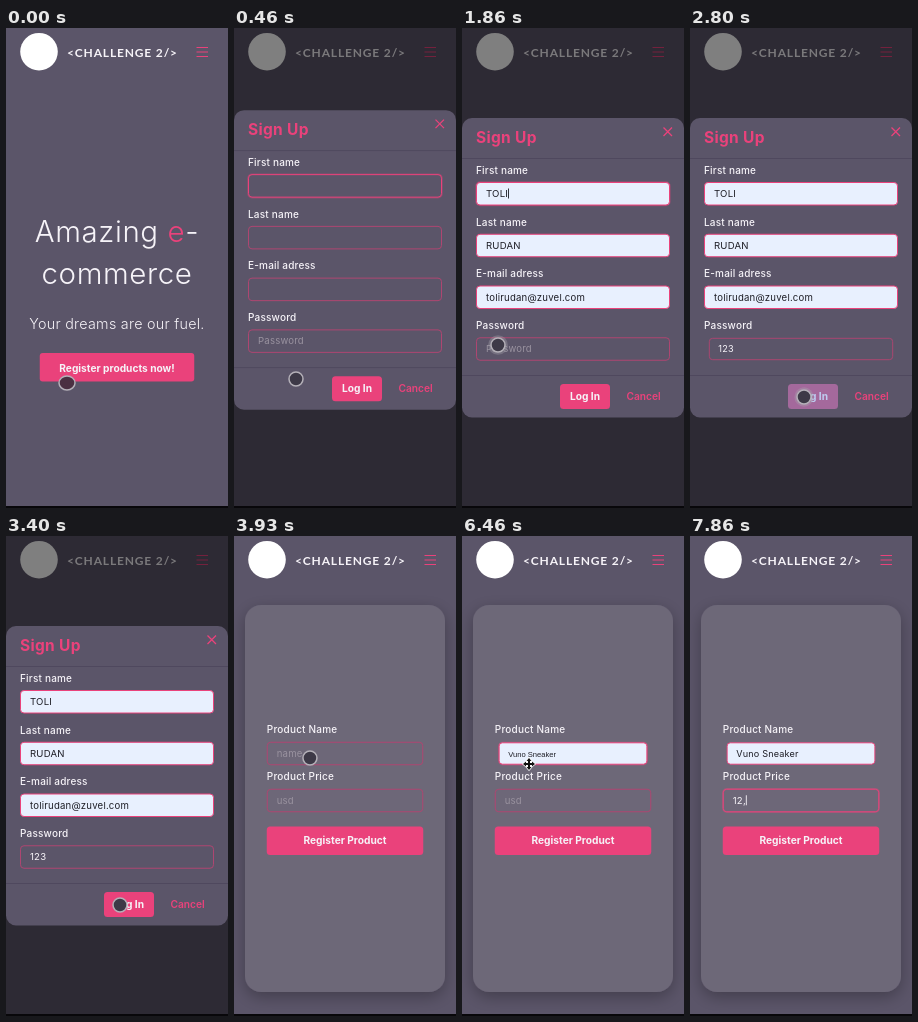
Recreate the animation shown at these times as an HTML page. Size 222 by 480 pixels, loop 8000 ms.

```html
<!DOCTYPE html>
<html lang="en">
<head>
<meta charset="utf-8">
<title>Register products</title>
<style>
  html, body { margin: 0; width: 100%; height: 100%; overflow: hidden; background: #5b5569; }
  svg { display: block; width: 100%; height: 100%; }
  text { font-family: Inter, sans-serif; font-size: 10px; letter-spacing: .02em; fill: #f6f3f8; white-space: pre; }
  .brand { font: 700 12px Lato, sans-serif; letter-spacing: .07em; }
  .hero { font-size: 29.5px; font-weight: 350; text-anchor: middle; }
  .lead { font-size: 14.3px; font-weight: 350; text-anchor: middle; }
  .label { font-weight: 500; }
  .value { font-size: 9.6px; }
  .strong { font-size: 10.2px; font-weight: 700; text-anchor: middle; letter-spacing: 0; }
  .title { font-size: 15.5px; font-weight: 700; }
  .plain { font: 8px "Liberation Sans", Arial, sans-serif; letter-spacing: 0; }
  .pink { fill: #ea427b; }
  .line { fill: none; stroke: #ea427b; }
</style>
</head>
<body>
<svg viewBox="0 0 222 480" preserveAspectRatio="none">
  <defs>
    <filter id="shadow" x="-20%" y="-20%" width="140%" height="140%">
      <feDropShadow dx="0" dy="5" stdDeviation="8" flood-opacity=".28"/>
    </filter>
  </defs>
  <rect width="222" height="480" fill="#5b5569"/>

  <g id="home">
    <text class="hero" x="111" y="213.5">Amazing <tspan class="pink">e</tspan>-</text>
    <text class="hero" x="111" y="256">commerce</text>
    <text class="lead" x="111" y="301">Your dreams are our fuel.</text>
    <rect class="pink" x="33.75" y="325" width="154.5" height="28.5" rx="3"/>
    <text class="strong" x="111" y="343.5">Register products now!</text>
  </g>

  <g id="shop">
    <rect x="11" y="69" width="200" height="387" rx="16" fill="#6d6778" filter="url(#shadow)"/>
    <text class="label" x="32.8" y="197.3">Product Name</text>
    <text class="label" x="32.8" y="244.3">Product Price</text>
    <g id="shopFields"></g>
    <rect class="pink" x="32.75" y="290.5" width="156.5" height="28.5" rx="3.5"/>
    <text class="strong" x="111" y="308.2">Register Product</text>
  </g>

  <circle cx="33" cy="23.7" r="18.8" fill="#fff"/>
  <text class="brand" x="61" y="28.5">&lt;CHALLENGE 2/&gt;</text>
  <path class="line" stroke-width="1.2" d="M190.500 19.500h11.500M190.500 24h11.500M190.500 28.500h11.500"/>

  <rect id="backdrop" width="222" height="480"/>
  <g id="modal">
    <rect y="90" width="222" height="299.5" rx="10" fill="#5b5569"/>
    <path d="M0 130.5H222M0 347.5H222" stroke="#4f485e"/>
    <text class="title pink" x="14" y="115">Sign Up</text>
    <path class="line" stroke-width="1.3" d="M201.500 99.500l8.500 8.500m0-8.500l-8.500 8.500"/>
    <text class="label" x="14" y="146">First name</text>
    <text class="label" x="14" y="198">Last name</text>
    <text class="label" x="14" y="249">E-mail adress</text>
    <text class="label" x="14" y="301">Password</text>
    <g id="signFields"></g>
    <rect id="login" x="98" y="356" width="50" height="25" rx="3.5"/>
    <text id="loginText" class="strong" x="123" y="372">Log In</text>
    <text class="strong pink" style="font-weight:600" x="181.5" y="372">Cancel</text>
  </g>

  <g id="pointer">
    <circle id="halo" fill="#aaa6ae" fill-opacity=".35"/>
    <ellipse id="dot" stroke="#b4b0b8" stroke-width="1.5"/>
  </g>
  <path id="mover" d="M0-6l2.500 3h-1.500v2h2v-1.500l3 2.500-3 2.500v-1.500h-2v2h1.500l-2.500 3-2.500-3h1.500v-2h-2v1.500l-3-2.500 3-2.500v1.500h2v-2h-1.500z"
        fill="#111" stroke="#fff" stroke-width="1.6" stroke-linejoin="round" paint-order="stroke"/>
  <rect y="478" width="222" height="2" fill="#08070a"/>
</svg>
<script>
const LOOP = 8000;
const PINK = [234, 66, 123], DIM = [174, 70, 113], DARK = [30, 30, 38];
const WHITE = [246, 243, 248], PALE = [232, 240, 254], PLUM = [164, 105, 156];
const $ = id => document.getElementById(id);
const set = (el, attrs) => Object.entries(attrs).forEach(([k, v]) => el.setAttribute(k, v));
const ramp = (t, a, b) => Math.min(1, Math.max(0, (t - a) / (b - a)));
const easeOut = p => 1 - (1 - p) ** 3;
const rgb = c => `rgb(${c.map(Math.round)})`;
const mix = (a, b, p) => rgb(a.map((v, i) => v + (b[i] - v) * p));
const show = (el, on) => { el.style.display = on ? '' : 'none'; };

function add(parent, tag, attrs = {}) {
  const el = document.createElementNS('http://www.w3.org/2000/svg', tag);
  set(el, attrs);
  return parent.appendChild(el);
}

// Linear path through [time, x, y] stops.
function along(t, stops) {
  const i = stops.findIndex(s => s[0] > t);
  if (i < 0) return stops.at(-1).slice(1);
  if (i === 0) return stops[0].slice(1);
  const [a, b] = [stops[i - 1], stops[i]];
  const p = ramp(t, a[0], b[0]);
  return [1, 2].map(k => a[k] + (b[k] - a[k]) * p);
}

function makeField(parent, x, y, w, base, placeholder = '') {
  const h = 23.5, cx = x + w / 2, cy = y + h / 2;
  const box = { x: x + .5, y: y + .5, width: w - 1, height: h - 1, rx: 3.5 };
  const g = add(parent, 'g');
  const glow = add(g, 'rect', { ...box, fill: 'none', stroke: rgb(PINK), 'stroke-width': 2.5, 'stroke-opacity': .35 });
  const rect = add(g, 'rect', { ...box, 'stroke-width': 1 });
  const label = add(g, 'text', { x: x + 10, y: y + 15 });
  const caret = add(g, 'rect', { y: y + 6.5, width: .9, height: 10 });
  return ({ text = '', fill = 0, preview = false, focus = false, blink = false, scale = 1 }) => {
    const ink = mix(WHITE, DARK, fill);
    set(g, { transform: `translate(${cx} ${cy}) scale(${scale}) translate(${-cx} ${-cy})` });
    set(rect, { fill: mix(base, PALE, fill), stroke: rgb(focus || fill ? PINK : DIM) });
    label.textContent = text || placeholder;
    label.setAttribute('class', preview ? 'plain' : 'value');
    label.style.fill = text ? ink : '#99929f';
    const end = text && !preview ? label.getComputedTextLength() : 0;
    set(caret, { x: x + 10 + end, fill: ink });
    show(glow, focus);
    show(caret, focus && blink);
  };
}

const MODAL_BG = [91, 85, 105], CARD_BG = [109, 103, 120];
const [first, last, email, password] = ['', '', '', 'Password'].map((hint, i) =>
  makeField($('signFields'), 14, 154 + i * 51.75, 194, MODAL_BG, hint));
const [product, price] = ['name', 'usd'].map((hint, i) =>
  makeField($('shopFields'), 32.75, 205.75 + i * 47, 156.5, CARD_BG, hint));

const typed = (t, text, times) => text.slice(0, times.filter(at => t >= at).length);
const blinks = (t, start) => Math.floor((t - start) / 530) % 2 === 0;

const POINTER = [
  [0, 61, 355], [260, 62, 351], [1730, 62, 351], [1860, 36, 317],
  [2600, 36, 317], [2790, 114, 369], [3660, 114, 369], [3800, 96, 290],
  [3930, 76, 222], [4130, 67, 228], [6660, 67, 228]
];
const PRESSES = [[0, 200], [1800, 2000], [2740, 2960], [4150, 4330]];

function drawSignUp(t) {
  const opening = easeOut(ramp(t, 300, 650));
  const closing = ramp(t, 3430, 3580);
  set($('backdrop'), { opacity: .5 * ramp(t, 60, 330) * (1 - ramp(t, 3480, 3660)) });
  set($('modal'), {
    opacity: Math.min(1, opening * 1.3) * (1 - closing),
    transform: `translate(0 ${-50 * (1 - opening) - 40 * closing})`
  });

  const shown = t >= 860, accepted = t >= 1460;
  const fill = shown ? ramp(t, 790, 1090) : 0;
  const preview = shown && !accepted;
  const entry = text => ({ text: shown ? text : '', fill, preview });
  first({ ...entry('TOLI'), focus: t < 2000, blink: blinks(t, 800) });
  last(entry('RUDAN'));
  email(entry(accepted ? 'tolirudan@zuvel.com' : 'toli.rudan@korvu.com'));
  password({
    text: typed(t, '123', [2130, 2260, 2400]),
    focus: t >= 2000 && t < 2750, blink: blinks(t, 2400),
    scale: 1 - .05 * (ramp(t, 1870, 2100) - ramp(t, 2810, 3000))
  });

  const hover = ramp(t, 2660, 2790) * (1 - ramp(t, 3000, 3400));
  $('login').style.fill = mix(PINK, PLUM, hover);
  $('loginText').style.fill = mix(WHITE, [190, 204, 240], hover);
}

function drawShop(t) {
  const chosen = t >= 6260, preview = chosen && t < 6660;
  product({
    text: chosen ? 'Vuno Sneaker' : '',
    fill: chosen ? ramp(t, 6200, 6440) : 0,
    preview,
    focus: t >= 4200 && t < 6800,
    blink: !preview && blinks(t, 4330),
    scale: 1 - .05 * ramp(t, 3950, 4250)
  });
  price({
    text: typed(t, '12,', [7130, 7460, 7600]),
    focus: t >= 6860, blink: t >= 7860 || blinks(t, 6930)
  });
}

function drawPointer(t) {
  const [x, y] = along(t, POINTER);
  const press = PRESSES.find(([a, b]) => t >= a && t < b);
  const p = press ? Math.sin(Math.PI * ramp(t, ...press)) : 0;
  const place = { transform: `translate(${x} ${y})` };
  const moving = t >= 6260, onButton = t < 200;
  set($('pointer'), place);
  set($('mover'), place);
  set($('halo'), { r: 7 + 3.5 * p });
  set($('dot'), { rx: onButton ? 8 : 7, ry: 7, fill: onButton ? '#4b3042' : '#3d3947' });
  show($('pointer'), !moving);
  show($('mover'), moving && t < 6800);
}

function draw(t) {
  const inShop = t >= 3530, inModal = t >= 60 && t < 3660;
  show($('home'), !inShop);
  show($('shop'), inShop);
  show($('modal'), inModal);
  show($('backdrop'), inModal);
  if (inModal) drawSignUp(t);
  if (inShop) drawShop(t);
  drawPointer(t);
}

const start = performance.now();
function frame() {
  draw((performance.now() - start) % LOOP);
  requestAnimationFrame(frame);
}
frame();
</script>
</body>
</html>
```
